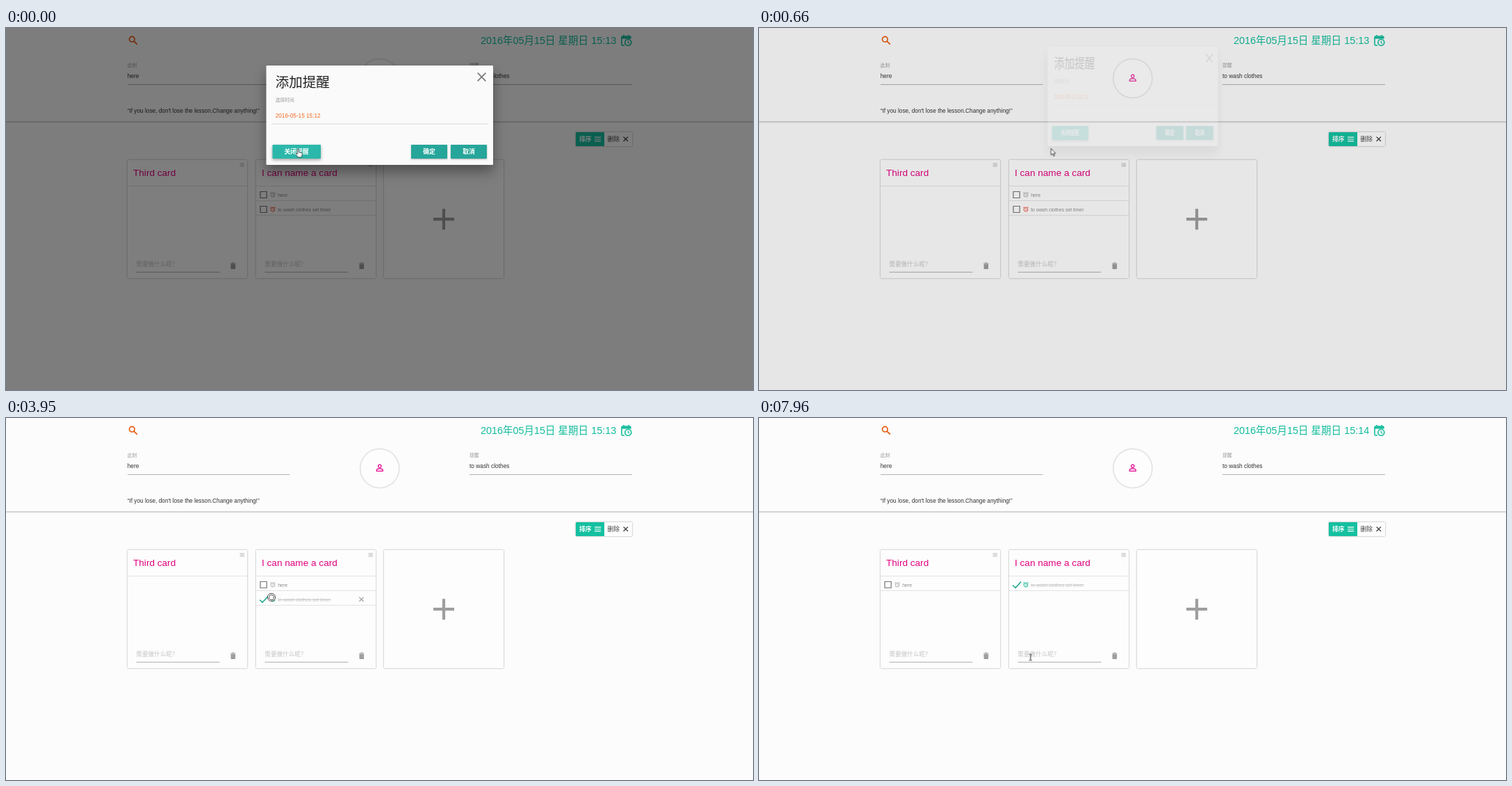
Animation of 1075x521 px, one loop 8000 ms. Source, as an HTML page:

```html
<!DOCTYPE html>
<html lang="zh">
<head>
<meta charset="utf-8">
<title>Reminder cards</title>
<style>
html, body { margin: 0; width: 100%; height: 100%; overflow: hidden; background: #fcfcfc; }
svg { display: block; width: 1075px; height: 521px; }
text { font-family: "Liberation Sans", "Noto Sans CJK SC", "Noto Sans CJK", "Noto Sans CJK JP", sans-serif; white-space: pre; }
.label { font-size: 6.8px; fill: #9a9a9a; }
.value { font-size: 8.35px; fill: #333; }
.date { font-size: 14.45px; font-weight: 300; fill: #12bc9c; }
.title { font-size: 13.6px; fill: #e2007f; }
.item { font-size: 6.95px; fill: #8c8c8c; }
.hint { font-size: 8.6px; fill: #c4c4c4; }
.btn { font-size: 8.8px; fill: #fff; font-weight: 700; }
.line { fill: none; stroke: #9e9e9e; stroke-width: .8; }
.rule { fill: none; stroke: #e2e2e2; }
.paper { fill: #fdfdfd; filter: drop-shadow(0 .9px .8px rgba(0,0,0,.38)); }
.icon { fill: none; stroke-width: 1.2; }
.teal { fill: #26a69a; filter: drop-shadow(0 1px 1.2px rgba(0,0,0,.3)); }

/* Every track shares one stepped 8 s clock */
.t { animation: 8s step-end infinite; }
#shade { animation-name: shade; }
#modal { animation-name: modal; transform-origin: 537.5px 0; }
#ripple { animation-name: ripple; }
#cursor { animation-name: move; }
#arrow { animation-name: arrow; }
#hand { animation-name: hand; }
#grab { animation-name: grab; }
#beam { animation-name: beam; }
#closeA { animation-name: closeA; }
#closeB { animation-name: closeB; }
#closeC { animation-name: closeC; }
#here { animation-name: here; }
#ghost { animation-name: ghost; }
#wash { animation-name: wash; }
#tick { animation-name: tick; }
.before { animation-name: before; }
.after { animation-name: after; }
#old { animation-name: old; }
#new { animation-name: new; }

@keyframes shade { 0% { opacity: .5 } 6.75% { opacity: .42 } 8.25% { opacity: .087 } 10.125% { opacity: 0 } }
@keyframes modal {
  0% { opacity: 1; transform: none }
  6.75% { opacity: .81; transform: translateY(-5px) scaleX(.951) }
  8.25% { opacity: .17; transform: translateY(-27px) scaleX(.752) }
  10.125% { opacity: 0; transform: translateY(-33px) scaleX(.7) }
}
@keyframes ripple {
  0% { opacity: 0; transform: scale(0) }
  4.875% { opacity: .1; transform: scale(.4) }
  6.75% { opacity: .1; transform: scale(1) }
  8.25% { opacity: 0 }
}
@keyframes move {
  0% { transform: translate(420.5px,174px) }
  8.25% { transform: translate(420.3px,173.3px) }
  15.25% { transform: translate(418px,176px) }
  17.125% { transform: translate(416px,184px) }
  19% { transform: translate(413px,197px) }
  20.875% { transform: translate(410px,212px) }
  22.75% { transform: translate(408px,232px) }
  24.625% { transform: translate(406px,244px) }
  26.5% { transform: translate(404px,257px) }
  28.375% { transform: translate(392px,260px) }
  30% { transform: translate(380px,262px) }
  31.75% { transform: translate(370px,260.5px) }
  47.5% { transform: translate(374px,260px) }
  49.125% { transform: translate(382px,258px) }
  50.875% { transform: translate(392px,252px) }
  52.5% { transform: translate(403px,246px) }
  54.25% { transform: translate(414px,242px) }
  56% { transform: translate(425px,240px) }
  57.625% { transform: translate(433px,239px) }
  66.375% { transform: translate(420px,239px) }
  68% { transform: translate(385px,240px) }
  69.75% { transform: translate(345px,241px) }
  71.5% { transform: translate(305px,241px) }
  73.125% { transform: translate(280px,241px) }
  76.25% { transform: translate(290px,241px) }
  77.875% { transform: translate(312px,241px) }
  79.625% { transform: translate(338px,241px) }
  81.25% { transform: translate(351px,236px) }
  82.875% { transform: translate(372px,241px) }
  84.5% { transform: translate(388px,241px) }
  86.25% { transform: translate(400px,241px) }
  87.875% { transform: translate(408px,242px) }
  89.375% { transform: translate(408px,244px) }
  91.125% { transform: translate(406px,254px) }
  92.75% { transform: translate(402px,275px) }
  94.5% { transform: translate(398px,298px) }
  96.125% { transform: translate(395px,318px) }
  97.875% { transform: translate(392px,336px) }
  99.5% { transform: translate(390.7px,344.5px) }
}
@keyframes arrow { 0%, 22.75%, 82.875%, 97.875% { opacity: 0 } 8.25%, 81.25%, 91.125% { opacity: 1 } }
@keyframes hand { 0%, 31.75% { opacity: 1 } 8.25%, 49.125% { opacity: 0 } }
@keyframes grab { 0%, 31.75%, 81.25%, 91.125% { opacity: 0 } 22.75%, 49.125%, 82.875% { opacity: 1 } }
@keyframes beam { 0% { opacity: 0 } 97.875% { opacity: 1 } }
@keyframes closeA { 0%, 26.5%, 66.375%, 91.125% { opacity: 0 } 22.75%, 52.5%, 82.875% { opacity: 1 } }
@keyframes closeB { 0%, 52.5% { opacity: 0 } 26.5% { opacity: 1 } }
@keyframes closeC { 0%, 81.25% { opacity: 0 } 73.125% { opacity: 1 } }
@keyframes here {
  0% { transform: translate(360px,0); opacity: 1 }
  66.375% { transform: translate(360px,0); opacity: .5 }
  69.75% { transform: translate(175px,0); opacity: .5 }
  73.125% { transform: translate(175px,0); opacity: 1 }
}
@keyframes ghost {
  0% { opacity: 0 }
  66.375% { opacity: .5; transform: translate(347px,0) }
  68% { opacity: .5; transform: translate(312px,1px) }
  69.75% { opacity: .5; transform: translate(272px,2px) }
  71.5% { opacity: .5; transform: translate(232px,2px) }
  73.125% { opacity: 0 }
}
@keyframes wash { 0% { transform: translate(360px,21px) } 69.75% { transform: translate(360px,0) } }
@keyframes tick {
  0% { opacity: 0; transform: scale(0) }
  37.5% { opacity: 1; transform: scale(.4) }
  39.125% { opacity: 1; transform: scale(.8) }
  40.875% { opacity: 1; transform: none }
}
@keyframes before { 0% { opacity: 1 } 37.5% { opacity: 0 } }
@keyframes after { 0% { opacity: 0 } 37.5% { opacity: 1 } }
@keyframes old { 0% { opacity: 1 } 61.125% { opacity: 0 } }
@keyframes new { 0% { opacity: 0 } 61.125% { opacity: 1 } }
</style>
</head>
<body>
<svg viewBox="0 0 1075 521">
  <defs>
    <g id="alarm" class="icon" stroke="currentColor">
      <circle r="2.9" cy=".4" stroke-width="1"/>
      <path d="M0-1.2V.6L1.3 1.4M-3.7-2.2-1.9-3.7M3.7-2.2 1.9-3.7" stroke-width=".9"/>
    </g>
    <path id="box" class="icon" stroke="#757575" d="M6 235.5h9.2v9H6z"/>
    <path id="cross" class="icon" d="M-3.2-3.2 3.2 3.2M3.2-3.2-3.2 3.2"/>
    <path id="bars" class="icon" d="M-1-.65H1M-1 0H1M-1 .65H1"/>
    <g id="card">
      <rect class="paper" y="190" width="172" height="170" rx="1"/>
    </g>
    <g id="list">
      <use href="#card"/>
      <path class="rule" d="M0 227.5H172"/>
      <path class="icon" stroke="#bdbdbd" stroke-width="1" d="M161.5 195h6.5M161.5 197h6.5M161.5 199h6.5" style="stroke-width:1"/>
      <text class="hint" x="12.3" y="343.2">需要做什么呢？</text>
      <path class="line" d="M12.5 351.4H132.5"/>
      <path fill="#9e9e9e" d="M148 338.4h2l.6-.9h2.4l.6.9h2v1h-7.6zM148.5 340h6.6v6q0 1-1 1h-4.6q-1 0-1-1z"/>
    </g>
    <g id="hereRow">
      <use href="#box"/>
      <use href="#alarm" x="24" y="239.8" color="#aaa"/>
      <text class="item" x="31.2" y="242.6">here</text>
      <path class="rule" d="M0 248.5H172"/>
    </g>
  </defs>

  <rect width="1075" height="521" fill="#fcfcfc"/>

  <!-- Header -->
  <path d="M0 135.2H1075" stroke="#d6d6d6" stroke-width="2.2"/>
  <g class="icon" stroke="#e8590c" style="stroke-width:1.7">
    <circle cx="181.3" cy="16.2" r="3.8"/>
    <path d="M184.2 19.1 188.8 23.7"/>
  </g>
  <text class="date" x="683" y="23.4">2016年05月15日 星期日</text>
  <text id="old" class="date t" x="878.4" y="23.4" text-anchor="end">15:13</text>
  <text id="new" class="date t" x="878.4" y="23.4" text-anchor="end">15:14</text>
  <g class="icon" stroke="#12bc9c" style="stroke-width:1.6">
    <path d="M890 25H887.5Q886 25 886 23.500V13.500Q886 12 887.500 12H897.500Q899 12 899 13.500V15M889 10v2M896 10v2"/>
    <path d="M886 14H899" stroke-width="3"/>
    <circle cx="895.3" cy="20.800" r="4.500"/>
    <path d="M895.300 18.300V21L897.300 22.300" stroke-width="1.200"/>
  </g>
  <text class="label" x="174.700" y="55.600">此刻</text>
  <text class="value" x="174.700" y="71.500">here</text>
  <path class="line" d="M175 81.400H408.500M667 81.400H901"/>
  <text class="label" x="667" y="55.600">提醒</text>
  <text class="value" x="667" y="71.500">to wash clothes</text>
  <text class="value" x="174.700" y="122" style="font-size:8.27px">“If you lose, don't lose the lesson.Change anything!”</text>
  <circle class="paper" cx="537.800" cy="72.500" r="27.500"/>
  <g class="icon" stroke="#e2008c">
    <circle cx="537.800" cy="69.200" r="2.100"/>
    <path d="M533.300 76.300v-1.200q0-2.200 4.500-2.200t4.500 2.200v1.200z"/>
  </g>

  <!-- Sort and delete -->
  <rect class="paper" x="820" y="150" width="81" height="20" rx="1"/>
  <path fill="#14c0a0" d="M821 150h40v20h-40q-1 0-1-1v-18q0-1 1-1z"/>
  <text class="btn" x="825" y="163.200">排序</text>
  <path class="icon" stroke="#fff" d="M847 157.200h9.200M847 160h9.200M847 162.800h9.200"/>
  <text class="btn" x="865.500" y="163.200" style="fill:#444;font-weight:400">删除</text>
  <use href="#cross" x="891.800" y="159.800" stroke="#333"/>

  <!-- Cards -->
  <use href="#list" x="175"/>
  <use href="#list" x="360"/>
  <use href="#card" x="544"/>
  <text class="title" x="183" y="213.300">Third card</text>
  <text class="title" x="368" y="213.300">I can name a card</text>
  <path d="M615 275.200H645M630 260.200V290.200" stroke="#9e9e9e" stroke-width="4.200"/>

  <g id="wash" class="t">
    <g class="t before">
      <use href="#box"/>
      <use href="#alarm" x="24" y="239.800" color="#f0523a"/>
      <text class="item" x="31.200" y="242.600">to wash clothes set timer</text>
    </g>
    <g class="t after">
      <use href="#alarm" x="24" y="239.800" color="#12b08e"/>
      <text class="item" x="31.200" y="242.600" style="fill:#c2c2c2;text-decoration:line-through">to wash clothes set timer</text>
    </g>
    <g transform="translate(9 245)">
      <path id="tick" class="icon t" stroke="#12a487" style="stroke-width:1.500" d="M-3.700-4.200 0-.500 8-9.300"/>
    </g>
    <path class="rule" d="M0 248.500H172"/>
  </g>
  <g id="here" class="t"><use href="#hereRow"/></g>
  <g id="ghost" class="t"><use href="#hereRow"/></g>
  <g stroke="#9a9a9a" style="stroke-width:1.500">
    <g id="closeA" class="t"><use href="#cross" x="511.500" y="240"/></g>
    <g id="closeB" class="t"><use href="#cross" x="511.500" y="261"/></g>
    <g id="closeC" class="t"><use href="#cross" x="326.500" y="240"/></g>
  </g>

  <!-- Dialog -->
  <rect id="shade" class="t" width="1075" height="521"/>
  <g id="modal" class="t">
    <rect x="374.500" y="54" width="326.500" height="143" rx="1" fill="#fafafa" style="filter:drop-shadow(0 10px 9px rgba(0,0,0,.36))"/>
    <text x="387.700" y="85.300" fill="#222" style="font-size:19.500px;font-weight:300">添加提醒</text>
    <path class="icon" stroke="#7c7c7c" style="stroke-width:1.800" d="M678.700 64.700 690.300 76.300M690.300 64.700 678.700 76.300"/>
    <text class="label" x="387.700" y="105.600">选择时间</text>
    <text x="387.700" y="128.800" fill="#f4691e" style="font-size:8.230px">2016-05-15 15:12</text>
    <path d="M382 138H694" stroke="#d8d8d8"/>
    <rect class="teal" x="383.500" y="168" width="69.500" height="20" rx="1" style="fill:#2bb8aa;filter:drop-shadow(0 2px 2px rgba(0,0,0,.35))"/>
    <g transform="translate(419.500 178)"><ellipse id="ripple" class="t" rx="22" ry="10"/></g>
    <rect class="teal" x="583" y="168" width="52" height="20" rx="1"/>
    <rect class="teal" x="640" y="168" width="52" height="20" rx="1"/>
    <text class="btn" x="400.400" y="181.300">关闭提醒</text>
    <text class="btn" x="600.200" y="181.300">确定</text>
    <text class="btn" x="657.200" y="181.300">取消</text>
  </g>

  <!-- Pointer -->
  <g id="cursor" class="t" fill="#fff" stroke="#222" stroke-width=".8" stroke-linejoin="round">
    <path id="arrow" class="t" d="M0 0V9.600L2.200 7.600 3.800 11 5.100 10.400 3.600 7.100H6.500z"/>
    <path id="hand" class="t" d="M-1 1A1 1 0 0 1 1 1V4.800L4.500 5.600Q5.900 6 5.700 7.500L5 12H-.500L-3.300 8Q-4 6.500-2.500 6.500L-1 7.600z"/>
    <g id="grab" class="t">
      <circle r="5.600"/>
      <path fill="none" d="M-3.700 1.500Q-3-1-2.500-2.500-1-4 .500-3.200 2.500-3.500 3.300-1.500 4 1 2 3.400 0 4.500-2 3z"/>
    </g>
    <path id="beam" class="t" fill="none" stroke-width="1" d="M-2-4.300H-.700L0-3.600.700-4.300H2M0-3.600V3.600M-2 4.300H-.700L0 3.600.700 4.300H2"/>
  </g>
</svg>
</body>
</html>
```
